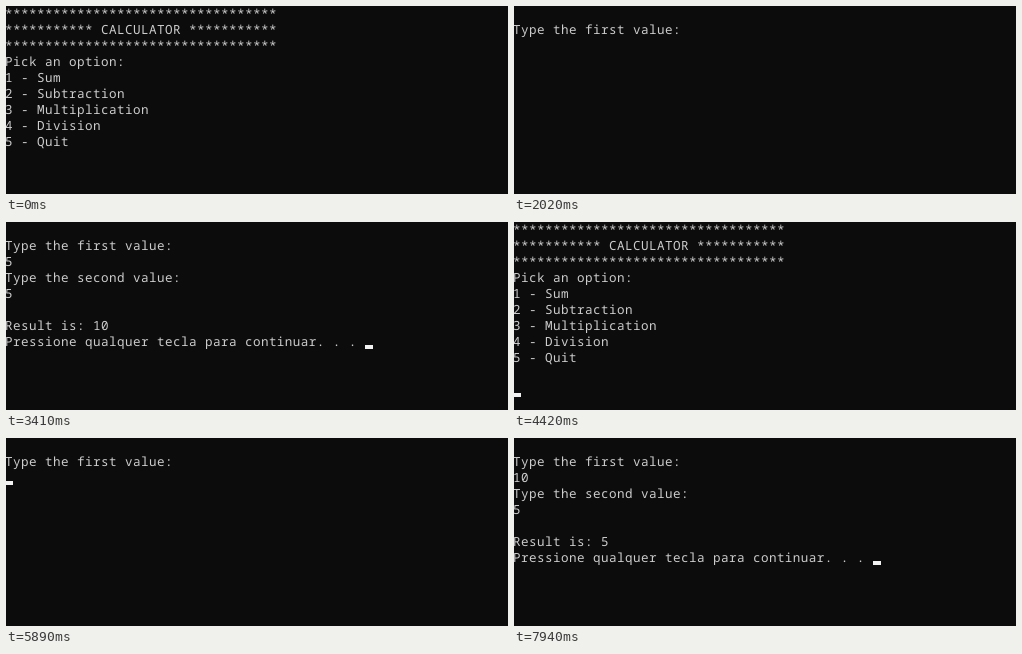
These frames come from a looping animation (502 by 188 pixels, 8000 ms). An HTML page:

```html
<!DOCTYPE html>
<html lang="en">
<head>
<meta charset="utf-8">
<title>Console calculator</title>
<style>
html, body { margin: 0; width: 100%; height: 100%; overflow: hidden; background: #0c0c0c; }
svg { display: block; width: 502px; height: 188px; }
text {
  font: 12.6px "Noto Sans Mono", "DejaVu Sans Mono", monospace;
  letter-spacing: .44px; /* 8px console cells */
  text-rendering: geometricPrecision;
  white-space: pre;
  fill: #ccc;
}
[class] { animation: 8s step-end infinite; }
.menu   { animation-name: menu; }
.form   { animation-name: form; }
.sum    { animation-name: sum; }
.sub    { animation-name: sub; }
.a5     { animation-name: a5; }
.a1     { animation-name: a1; }
.a0     { animation-name: a0; }
.second { animation-name: second; }
.b5     { animation-name: b5; }
.result { animation-name: result; }
.r10    { animation-name: r10; }
.r5     { animation-name: r5; }
.cursor { animation-name: cursor; fill: #f2f2f2; }

@keyframes menu   { 0%, 55.25% { opacity: 1 } 18.25%, 73.625%, 100% { opacity: 0 } }
@keyframes form   { 0%, 55.25% { opacity: 0 } 18.25%, 73.625%, 100% { opacity: 1 } }
@keyframes sum    { 0%, 18.25%, 100% { opacity: 0 } 14.375% { opacity: 1 } }
@keyframes sub    { 0%, 73.625%, 100% { opacity: 0 } 61% { opacity: 1 } }
@keyframes a5     { 0%, 55.25%, 100% { opacity: 0 } 30.875% { opacity: 1 } }
@keyframes a1     { 0% { opacity: 0 } 83.5%, 100% { opacity: 1 } }
@keyframes a0     { 0% { opacity: 0 } 85.375%, 100% { opacity: 1 } }
@keyframes second { 0%, 55.25% { opacity: 0 } 34%, 89.375%, 100% { opacity: 1 } }
@keyframes b5     { 0%, 55.25% { opacity: 0 } 38.75%, 94.25%, 100% { opacity: 1 } }
@keyframes result { 0%, 55.25% { opacity: 0 } 42.625%, 99.25%, 100% { opacity: 1 } }
@keyframes r10    { 0%, 55.25%, 100% { opacity: 0 } 42.625% { opacity: 1 } }
@keyframes r5     { 0% { opacity: 0 } 99.25%, 100% { opacity: 1 } }

/* column * 8px, row * 16px; blinks off by leaving the stage */
@keyframes cursor {
  0%, 25.25%, 31.875%, 51.375%, 65%, 84.5% { transform: translate(0, -99px) }
  12.375%, 55.25%        { transform: translate(0, 160px) }
  14.375%, 61%, 71.75%   { transform: translate(8px, 160px) }
  17.375%                { transform: translate(0, 176px) }
  18.25%, 73.625%        { transform: translate(0, 32px) }
  30.875%, 83.5%         { transform: translate(8px, 32px) }
  85.375%                { transform: translate(16px, 32px) }
  34%, 89.375%           { transform: translate(0, 64px) }
  38.75%, 94.25%         { transform: translate(8px, 64px) }
  41.625%, 98.25%        { transform: translate(0, 80px) }
  42.625%, 99.25%, 100%  { transform: translate(360px, 112px) }
  54.375%                { transform: translate(0, 128px) }
}
</style>
</head>
<body>
<svg viewBox="0 0 502 188">
  <rect width="502" height="188" fill="#0c0c0c"/>
  <g class="menu">
    <text x="-1" y="12">**********************************</text>
    <text x="-1" y="28">*********** CALCULATOR ***********</text>
    <text x="-1" y="44">**********************************</text>
    <text x="-1" y="60">Pick an option:</text>
    <text x="-1" y="76">1 - Sum</text>
    <text x="-1" y="92">2 - Subtraction</text>
    <text x="-1" y="108">3 - Multiplication</text>
    <text x="-1" y="124">4 - Division</text>
    <text x="-1" y="140">5 - Quit</text>
    <text class="sum" x="-1" y="172">1</text>
    <text class="sub" x="-1" y="172">2</text>
  </g>
  <g class="form">
    <text x="-1" y="28">Type the first value:</text>
    <text class="a5" x="-1" y="44">5</text>
    <text class="a1" x="-1" y="44">1</text>
    <text class="a0" x="7" y="44">0</text>
    <text class="second" x="-1" y="60">Type the second value:</text>
    <text class="b5" x="-1" y="76">5</text>
    <g class="result">
      <text x="-1" y="108">Result is:</text>
      <text class="r10" x="87" y="108">10</text>
      <text class="r5" x="87" y="108">5</text>
      <text x="-1" y="124">Pressione qualquer tecla para continuar. . .</text>
    </g>
  </g>
  <rect class="cursor" x="-1" y="11" width="8" height="4"/>
</svg>
</body>
</html>
```
